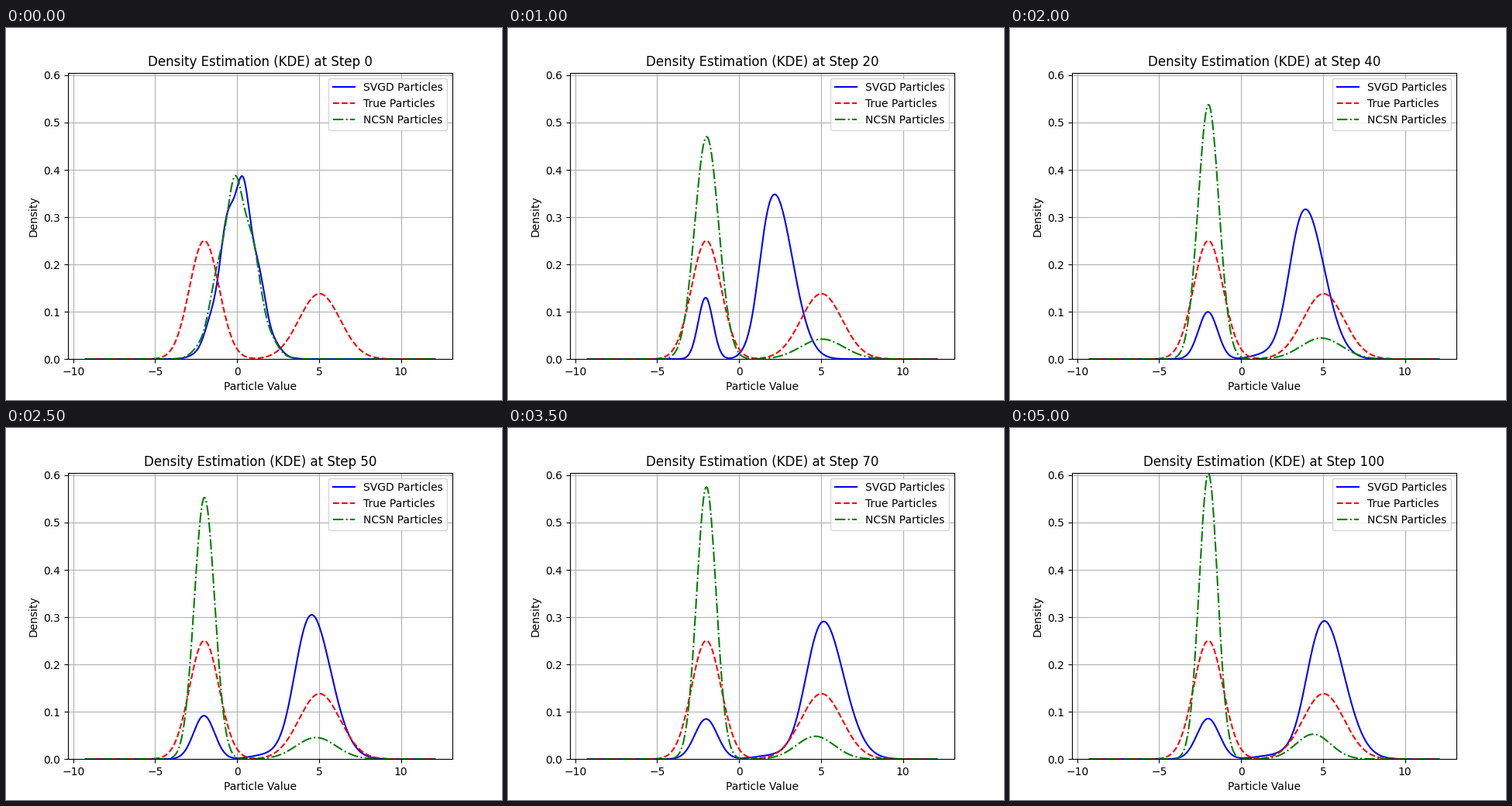
A matplotlib script that plays this animation: 640x480 px, repeating every 5500 ms.

```python
import numpy as np
import matplotlib.pyplot as plt
from matplotlib.animation import FuncAnimation

STEP, FRAMES, INTERVAL = 10, 11, 500
SCOTT = 1000 ** -.2
CUT = -1.054  # start values below this fall into the left mode

x = np.linspace(-9.25, 12.07, 1000)
q = np.linspace(-4, 4, 1001)
weight = np.exp(-q ** 2 / 2)
weight /= weight.sum()


def kde(particles, mass):
    """Gaussian kernel density with Scott's bandwidth."""
    mean = mass @ particles
    h = SCOTT * np.sqrt(mass @ (particles - mean) ** 2)
    z = (x[:, None] - particles) / h
    return np.exp(-z ** 2 / 2) @ mass / (h * np.sqrt(2 * np.pi))


def mixture(share, left, right):
    """Density of two normal clouds, each given as (mean, spread)."""
    clouds = [mean + spread * q for mean, spread in (left, right)]
    return kde(np.concatenate(clouds),
               np.concatenate([share * weight, (1 - share) * weight]))


def start(mean, spread, freq, phase):
    """Slightly uneven normal sample."""
    return kde(mean + spread * (q - .026 * np.sin(freq * (q - phase))), weight)


def svgd_density(step):
    if step == 0:
        return start(.12, 1.03, 5.7, .27)
    u = min((step - 10) / 60, 1)
    ease = 1 - (1 - u) ** 1.73
    centre = 1.04 + 3.97 * ease - .08 * max(0, (step - 70) / 30)
    fallen = -2 - .9 / step + 4 / step * (q + 1.57)
    lag = 3.3 * ease * np.exp(-np.maximum(q - CUT, 0) / .07)
    moving = centre + (1.03 + .09 * u) * q - lag
    return kde(np.where(q < CUT, fallen, moving), weight)


def ncsn_density(step):
    if step == 0:
        return start(0, 1.05, 5, -.15)
    v = (step - 10) / 90
    return mixture(.86, (-2 + .5 / step, 7.4 / step),
                   (5.15 - .75 * v, 1.2 - .3 * v))


fig, ax = plt.subplots(figsize=(6.4, 4.8), dpi=100)
svgd, = ax.plot(x, svgd_density(0), "b-", label="SVGD Particles")
ax.plot(x, mixture(.565, (-2, .15), (5.03, .888)), "r--",
        label="True Particles")
ncsn, = ax.plot(x, ncsn_density(0), "g-.", label="NCSN Particles")
title = ax.set_title("")
ax.set_xlabel("Particle Value")
ax.set_ylabel("Density")
ax.set_xlim(-10.315, 13.136)
ax.set_ylim(0, .60545)
ax.grid(True)
ax.legend(loc="upper right")


def draw(frame):
    step = frame * STEP
    svgd.set_ydata(svgd_density(step))
    ncsn.set_ydata(ncsn_density(step))
    title.set_text(f"Density Estimation (KDE) at Step {step}")
    return svgd, ncsn, title


anim = FuncAnimation(fig, draw, frames=FRAMES, interval=INTERVAL,
                     repeat=True, repeat_delay=0, blit=False)
plt.show()
```
